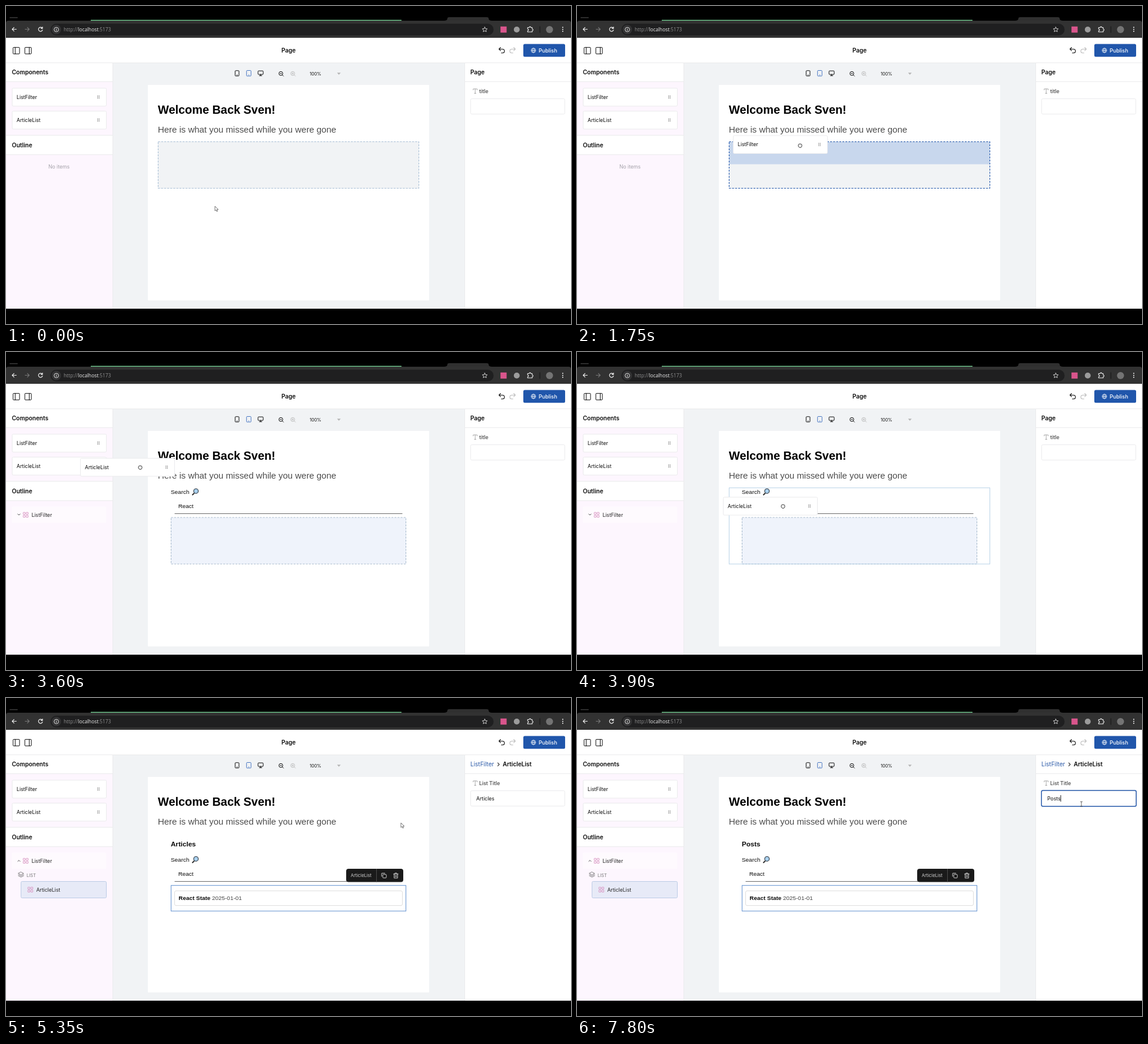
An HTML page for the animation above (8 s loop, 960 px wide and 540 px high).

```html
<!DOCTYPE html>
<html lang="en">
<head>
<meta charset="utf-8">
<title>Page editor</title>
<style>
html, body { margin: 0; width: 100%; height: 100%; overflow: hidden; background: #000; }
svg { display: block; width: 100vw; height: 100vh; }
text { font-family: Inter, sans-serif; white-space: pre; }
.doc { font-family: "Liberation Sans", Arial, sans-serif; }
.url { font-family: "Open Sans", sans-serif; }
</style>
</head>
<body>
<svg id="stage" viewBox="0 0 960 540"></svg>
<script>
const LOOP = 8000, STEP = 50;
const INK = '#0c0c0c', BLUE = '#2056ab', LINE = '#ebebed', PALE = '#c8d7ed';

// Markup helpers
const rect = (x, y, w, h, fill, more = '') =>
  `<rect x="${x}" y="${y}" width="${w}" height="${h}" fill="${fill}" ${more}/>`;
const frame = (x, y, w, h, stroke, more = '') => rect(x, y, w, h, 'none', `stroke="${stroke}" ${more}`);
const path = (d, stroke = INK, more = '') =>
  `<path d="${d}" fill="none" stroke="${stroke}" stroke-linecap="round" stroke-linejoin="round" ${more}/>`;
const text = (x, y, s, size = 8.65, fill = INK, more = '') =>
  `<text x="${x}" y="${y}" font-size="${size}" fill="${fill}" ${more}>${s}</text>`;
const bold = (x, y, s) => text(x, y, s, 10, INK, 'font-weight="600"');
const doc = (x, y, s, size = 9.92, more = '', fill = INK) => text(x, y, s, size, fill, `class="doc" ${more}`);
const at = (x, y, body, id = '') => `<g ${id && `id="${id}"`} transform="translate(${x} ${y})">${body}</g>`;
const group = (id, ...parts) => `<g id="${id}">${parts.join('')}</g>`;
const dashed = (x, y, w, h, stroke, more = '') =>
  frame(x, y, w, h, stroke, `stroke-width="1.1" stroke-dasharray="3.2 2" ${more}`);

const dots = (x, y) => [0, 1, 2].map(r => [0, 1].map(c =>
  `<circle cx="${x - 1.2 + c * 2.4}" cy="${y - 2 + r * 2}" r=".65" fill="#555"/>`).join('')).join('');
const card = name => rect(.5, .5, 160, 30.5, '#fff', `stroke="${LINE}" rx="2"`) +
  text(8, 18.7, name) + dots(147, 15.6);

const copyIcon = (x, y) => at(x, y, frame(-2, -2, 6, 6, '#ddd', 'rx="1" stroke-width=".9"') +
  path('M-4 1.5V-3.5Q-4 -4 -3.5 -4H1.5', '#ddd', 'stroke-width=".9"'));
const trashIcon = (x, y) => at(x, y,
  path('M-4 -2.6H4M-1.5 -2.6V-4.3H1.5V-2.6M-3 -2.6V4.3H3V-2.6M-1 -.4V2.3M1 -.4V2.3', '#ddd', 'stroke-width=".9"'));
const actionBar = (x, y, w, name) => rect(x, y, w, 22.5, '#1a1a1a', 'rx="4"') +
  text(x + 7.8, y + 14, name, 7.45, '#d4d4d4') + rect(x + w - 46, y, 1, 22.5, '#4a4a4a') +
  copyIcon(x + w - 32.8, y + 11.5) + trashIcon(x + w - 12.6, y + 11.5);

const gridIcon = (x, y) => [[0, 0], [5, 0], [0, 5], [5, 5]].map(([a, b]) =>
  frame(x + a, y + b, 3.4, 3.4, '#d78fc0', 'stroke-width=".9" rx=".5"')).join('');
const layers = (x, y) => path(`M${x} ${y - 4}l4.5 2.3l-4.5 2.3l-4.5 -2.3zm-4.5 4.3l4.5 2.3l4.5 -2.3m-9 2l4.5 2.3l4.5 -2.3`,
  '#666', 'stroke-width=".8"');
const chevron = (x, y, dir) => path(`M${x - 2} ${y + dir}l2 ${-2 * dir}l2 ${2 * dir}`, '#444', 'stroke-width=".9"');
const typeIcon = path('M793.8 142.5V140.8H800.6V142.5M797.2 140.8V148.3M795.8 148.3H798.6', '#999', 'stroke-width=".8"');
const label = s => typeIcon + text(804, 147.5, s, 8.65, '#5a5a5a', 'font-weight="600"');
const crumbs = (parent, x, name) => text(789, 116.2, parent, 10, '#2b5aa8') +
  path(`M${x} 110.2l2.5 2.6l-2.5 2.6`, '#222', 'stroke-width="1.1"') + bold(x + 8.3, 116.2, name);

const lens = (x, y, s, plus, c) => at(x, y, `<circle r="3.3" fill="none" stroke="${c}"/>` +
  path(`M2.5 2.5L4.5 4.5M-1.4 0H1.4${plus ? 'M0 -1.4V1.4' : ''}`, c, 'stroke-width=".9"'));

// Browser window
const browser = rect(0, 0, 960, 540, '#000') +
  `<path d="M744 25Q750 25 750 21Q750 19 753 19H817Q820 19 820 21Q820 25 826 25Z" fill="#303030"/>` +
  rect(6, 19, 14, 1.5, '#3a3a3a', 'rx=".7"') + rect(144, 23.6, 528, 1.4, '#73c990') +
  `<path d="M0 54V29Q0 25 4 25H956Q960 25 960 29V54Z" fill="#323232"/>` +
  rect(75.5, 30, 753, 20, '#1f1f20', 'rx="10"') +
  path('M17.5 39.5H10.5M13.7 36.3L10.5 39.5L13.7 42.7', '#eee', 'stroke-width="1.2"') +
  path('M32.5 39.5H39.5M36.3 36.3L39.5 39.5L36.3 42.7', '#777', 'stroke-width="1.1"') +
  path('M61.6 37.6A3.5 3.5 0 1 0 62 40.7M62 35.6V38.2H59.4', '#eee', 'stroke-width="1.2"') +
  `<circle cx="85.5" cy="40" r="8" fill="#343435"/><circle cx="85.5" cy="40" r="3.8" fill="none" stroke="#ddd"/>` +
  path('M85.5 39.7V41.7M85.5 38V38.1', '#ddd') +
  text(98, 43, 'http://<tspan fill="#eee">localhost</tspan>:5173', 8.3, '#8f8f8f', 'class="url"') +
  path('M813.5 35.8l1.2 2.7l3 .3l-2.2 2l.6 2.9l-2.6 -1.5l-2.6 1.5l.6 -2.9l-2.2 -2l3 -.3z', '#ddd', 'stroke-width=".9"') +
  rect(840.2, 34.8, 10.4, 10.4, '#d9558c') + `<circle cx="867.8" cy="40" r="5" fill="#9c9c9c"/>` +
  path('M886.3 36.5H889A1.4 1.4 0 0 1 891.8 36.5H894V39A1.4 1.4 0 0 1 894 42V44H886.3V42A1.4 1.4 0 0 0 886.3 39Z', '#eee', 'stroke-width="1.1"') +
  rect(906.6, 34.5, 1, 11, '#161616') + `<circle cx="923.5" cy="40" r="6" fill="#747474"/>` +
  [36.3, 39.7, 43.1].map(y => `<circle cx="946" cy="${y}" r="1" fill="#eee"/>`).join('');

// Editor shell
const toggle = (x, bar) => frame(x, 70.3, 11, 11, INK, 'rx="1"') + path(`M${bar} 70.3V81.3`);
const shell = rect(0, 54, 960, 460, '#fff') + rect(181, 96, 599, 418, '#f1f3f5') +
  rect(241, 134, 478, 366, '#fff', 'rx="1"') +
  rect(0, 129, 181, 90, '#fdf6fe') + rect(0, 253, 181, 261, '#fdf6fe') +
  [[0, 96, 960, 1], [0, 128, 181, 1], [780, 128, 180, 1], [0, 219, 181, 1], [0, 252, 181, 1], [181, 97, 1, 417], [779, 97, 1, 417]]
    .map(b => rect(...b, LINE)).join('') +
  toggle(12, 15.7) + toggle(32, 39.5) + bold(468, 78.7, 'Page') +
  path('M840.3 70.5L837.6 73.2L840.3 75.9M837.6 73.2H843.6A3 3 0 0 1 843.6 79.8H841.6', INK, 'stroke-width="1.1"') +
  path('M862.7 70.5L865.4 73.2L862.7 75.9M865.4 73.2H859.4A3 3 0 0 0 859.4 79.8H861.4', '#bbb', 'stroke-width="1.1"') +
  rect(879, 64.5, 71, 21.7, BLUE, 'rx="2.5"') +
  `<g fill="none" stroke="#fff" stroke-width=".8"><circle cx="896.2" cy="75.4" r="3.8"/><ellipse cx="896.2" cy="75.4" rx="1.6" ry="3.8"/><path d="M892.4 75.4H900"/></g>` +
  text(905, 78.6, 'Publish', 9, '#fff', 'font-weight="500"') +
  bold(10, 116.2, 'Components') + bold(10, 239.8, 'Outline') +
  at(10, 139, card('ListFilter')) + at(10, 178, card('ArticleList')) +
  frame(389.3, 109.8, 6.6, 9, INK, 'rx="1"') + path('M392.2 117H393') +
  frame(408.7, 109.5, 7.6, 9.4, '#4a78c4', 'rx="1"') + path('M412.1 117H412.9', '#4a78c4') +
  frame(428.2, 110.2, 8.8, 6, INK, 'rx="1"') + path('M432.6 116.2V118.3M430.5 118.3H434.7') +
  lens(467, 114.6, 1, false, INK) + lens(487.2, 114.6, 1, true, '#bdbdbd') +
  text(516, 117.6, '100%', 7.4) + `<path d="M562.5 113.2H568.7L565.6 116.8Z" fill="#b5b5b5"/>` +
  doc(258, 183, 'Welcome Back Sven!', 19.9, 'font-weight="700"', '#000') +
  doc(258, 214.8, 'Here is what you missed while you were gone', 14.95, '', '#4c4c4c') +
  rect(789.5, 157.5, 160, 26, '#fff', `stroke="${LINE}" rx="2"`);

const searchBox = doc(280, 241, 'Search') +
  path('M319.6 239.9L316.9 242.4', '#333', 'stroke-width="2"') +
  `<circle cx="322.8" cy="236.2" r="3.9" fill="#a9d0ee" stroke="#27313a" stroke-width="1.1"/>` +
  doc(292.7, 264.8, 'React') + rect(286.5, 274, 387, 1, '#6b6b6b');

document.getElementById('stage').innerHTML = browser + shell +
  group('noItems', text(72, 276, 'No items', 8.65, '#a3a1a8')) +
  group('empty', rect(258, 230, 444, 80, '#f1f3f5'),
    group('emptyOver', rect(259, 231, 442, 37.7, PALE)),
    group('emptyIdle', dashed(258.5, 230.5, 443, 79, '#a9bfd6')),
    group('emptyHot', dashed(258.5, 230.5, 443, 79, BLUE))) +
  group('filter',
    at(0, 0, searchBox, 'search'),
    group('zone', rect(280, 281, 400, 79, '#eff3fb'),
      group('zoneOver', rect(281, 281.5, 398, 30.3, PALE)),
      group('zoneIdle', dashed(280.5, 281, 399, 79, '#a9bbcd')),
      group('zoneHot', dashed(280.5, 281, 399, 79, BLUE))),
    group('filterHot', frame(258.5, 230.7, 443, 129.3, '#b9d3e8')),
    group('filterPick', frame(258.5, 230.7, 443, 129.3, '#6f9bd4', 'stroke-width="1.1"'),
      actionBar(605, 202.5, 92, 'ListFilter'))) +
  group('articles', group('settling', rect(280, 318, 400, 79, '#eff3fb')),
    doc(280, 252.4, '<tspan id="heading"></tspan>', 11.6, 'font-weight="700"'),
    rect(280.5, 318.3, 399, 43.5, '#fff', 'stroke="#6f9bd4" stroke-width="1.1"'),
    frame(286.5, 327.5, 387, 25, '#dedede', 'rx="2.5"'),
    doc(293.3, 343.3, '<tspan font-weight="700">React State</tspan> <tspan fill="#444">2025-01-01</tspan>'),
    actionBar(578, 290, 97, 'ArticleList')) +
  group('node',
    group('nodePick', frame(10.5, 262.5, 160, 65, '#bccce6', 'rx="2"'), rect(11, 263, 159, 26.5, '#e7eaf7'),
      text(79.7, 320, 'No items', 8.65, '#a3a1a8')),
    group('nodeRest', rect(10, 262.5, 160.5, 27.5, '#fff', 'rx="2" opacity=".5"')),
    group('nodeUp', chevron(22, 276.5, 1), layers(25.5, 299.6), text(35, 303.6, 'LIST', 7.45, '#777')),
    group('nodeDown', chevron(22, 276, -1)),
    gridIcon(29.2, 272.3), text(43.4, 279.5, 'ListFilter', 8.65, '#222')) +
  group('child', rect(25.5, 311.5, 145, 28, '#e7eaf7', 'rx="2" stroke="#bccce6"'),
    gridIcon(37.2, 321.2), text(51.4, 328.6, 'ArticleList', 8.65, '#222')) +
  group('panePage', bold(789, 116.2, 'Page'), label('title')) +
  group('paneFilter', crumbs('Page', 819.4, 'ListFilter'), label('Initial Search Query'), text(799, 173.6, 'React')) +
  group('paneArticle', crumbs('ListFilter', 835.6, 'ArticleList'), label('List Title'),
    group('focus', frame(789.2, 156.9, 161, 27.2, '#2a5cac', 'rx="2.5" stroke-width="1.5"')),
    group('marked', rect(799, 165, 32, 11.5, '#0078d7')),
    text(799, 173.6, '', 8.65, INK, 'id="field"'),
    rect(0, 165, .9, 11, '#000', 'id="caret"')) +
  at(0, 0, card('ListFilter'), 'dragFilter') + at(0, 0, card('ArticleList'), 'dragArticle') +
  group('cursor',
    group('arrow', `<path d="M0 0V7.8L1.9 6.2L3.1 9L4.5 8.4L3.3 5.7H5.8Z" fill="#fff" stroke="#555" stroke-width=".8" stroke-linejoin="round"/>`),
    group('fist', `<path d="M-2.8 -1.2Q-2.4 -3 -1 -2.5Q0 -3.4 1 -2.5Q2.8 -2.8 3 -.8V1Q2.6 3.4 0 3.4Q-2.2 3.2 -3 1Z" fill="#fff" stroke="#222" stroke-width=".9"/>`),
    group('palm', `<path d="M-1.9 4L-4 .7Q-3.8 -.6 -2.4 .5L-2.6 -2.4Q-1.9 -3.6 -1.3 -2.4Q-.8 -4.6 .1 -3Q1 -4.4 1.6 -2.5Q2.9 -3.4 3.2 -1.8V1.2Q3 3 2.2 4Z" fill="#fff" stroke="#222" stroke-width=".9" stroke-linejoin="round"/>`),
    group('beam', path('M-1.6 -4H-.5Q0 -4 0 -3.4V3.4Q0 4 -.5 4H-1.6M1.6 -4H.5Q0 -4 0 -3.4M0 3.4Q0 4 .5 4H1.6', '#444', 'stroke-width=".8"')));

const el = Object.fromEntries([...document.querySelectorAll('[id]')].map(n => [n.id, n]));
const show = (on, ...ids) => ids.forEach(id => el[id].style.display = on ? '' : 'none');
const move = (id, x, y) => el[id].setAttribute('transform', `translate(${x.toFixed(2)} ${y.toFixed(2)})`);

// Pointer path: time, x, y
const PATH = [
  [150, 355, 340], [550, 225, 235], [900, 124, 157], [1000, 124, 157], [1350, 255, 190],
  [1750, 379, 237], [1900, 379, 248], [2450, 379, 248], [2600, 357, 218], [2900, 230, 202],
  [3250, 112, 194], [3350, 112, 194], [3600, 228, 196], [3900, 350, 262], [4150, 384, 287],
  [4550, 384, 287], [5000, 470, 262], [5350, 671, 212], [5400, 741, 206], [5500, 810, 194],
  [5750, 857, 180], [8000, 857, 180]
];
const TYPED = [[6850, 'P'], [7100, 'Po'], [7350, 'Pos'], [7550, 'Post'], [7750, 'Posts']];

// Speed at a key; zero beside a rest
function slope(i, k) {
  const a = PATH[i - 1], b = PATH[i], c = PATH[i + 1];
  if (!a || !c || [a, c].some(p => p[1] === b[1] && p[2] === b[2])) return 0;
  return (c[k] - a[k]) / (c[0] - a[0]);
}
function pointer(t) {
  if (t <= PATH[0][0]) return PATH[0].slice(1);
  const i = PATH.findIndex(p => p[0] >= t) - 1, a = PATH[i], b = PATH[i + 1];
  const d = b[0] - a[0], u = (t - a[0]) / d, u2 = u * u, u3 = u2 * u;
  return [1, 2].map(k => (2 * u3 - 3 * u2 + 1) * a[k] + (u3 - 2 * u2 + u) * d * slope(i, k) +
    (3 * u2 - 2 * u3) * b[k] + (u3 - u2) * d * slope(i + 1, k));
}

// Card follows the pointer, then settles on its drop spot
function drag(id, t, [x, y], from, drop, end, gx, gy, tx, ty) {
  show(t >= from && t < end, id);
  const u = Math.min(1, Math.max(0, (t - drop) / 100)), k = 1 - (1 - u) ** 2;
  move(id, x - gx + (tx - x + gx) * k, y - gy + (ty - y + gy) * k);
}

function draw(t) {
  const within = (a, b) => t >= a && t < b;
  const p = pointer(t), [x, y] = p;
  const hasFilter = t >= 2200, hasList = t >= 4400;
  const picked = within(2200, 3400), dropped = within(3400, 4400);

  const overEmpty = within(1000, 2200) && x > 258 && y > 200;
  show(!hasFilter, 'noItems', 'empty');
  show(overEmpty, 'emptyOver', 'emptyHot');
  show(!overEmpty, 'emptyIdle');

  const overZone = dropped && x > 280 && y > 268;
  show(hasFilter, 'filter', 'node');
  show(!hasList, 'zone');
  show(overZone, 'zoneOver', 'zoneHot');
  show(!overZone, 'zoneIdle');
  show(dropped && x > 258 && y > 230, 'filterHot');
  show(picked, 'filterPick', 'nodePick', 'paneFilter');
  show(!picked, 'nodeRest');
  show(!dropped, 'nodeUp');
  show(dropped, 'nodeDown');
  move('search', 0, hasList ? 37 : 0);

  show(hasList, 'articles', 'child', 'paneArticle');
  show(within(4400, 4600), 'settling');
  show(!picked && !hasList, 'panePage');

  const word = TYPED.reduce((w, [from, s]) => t >= from ? s : w, 'Articles');
  const marked = within(6200, 6850);
  el.heading.textContent = el.field.textContent = word;
  el.field.setAttribute('fill', marked ? '#fff' : INK);
  show(t >= 5750, 'focus');
  show(marked, 'marked');
  show(t >= 5750 && !marked, 'caret');
  if (hasList) el.caret.setAttribute('x', 799 + el.field.getComputedTextLength());

  drag('dragFilter', t, p, 1000, 1900, 2200, 114, 17.5, 258, 230);
  drag('dragArticle', t, p, 3400, 4200, 4400, 102, 16, 280, 281);

  const fist = within(1000, 1900) || within(3400, 4200);
  const palm = !fist && (within(800, 2200) || within(3150, 4400));
  const beam = x > 789 && y < 185;
  move('cursor', x, y);
  show(fist, 'fist');
  show(palm, 'palm');
  show(beam, 'beam');
  show(!fist && !palm && !beam, 'arrow');
}

const start = performance.now();
function tick(now) {
  const t = Math.max(0, now - start) % LOOP;
  draw(t - t % STEP);
  requestAnimationFrame(tick);
}
draw(0);
requestAnimationFrame(tick);
</script>
</body>
</html>
```
